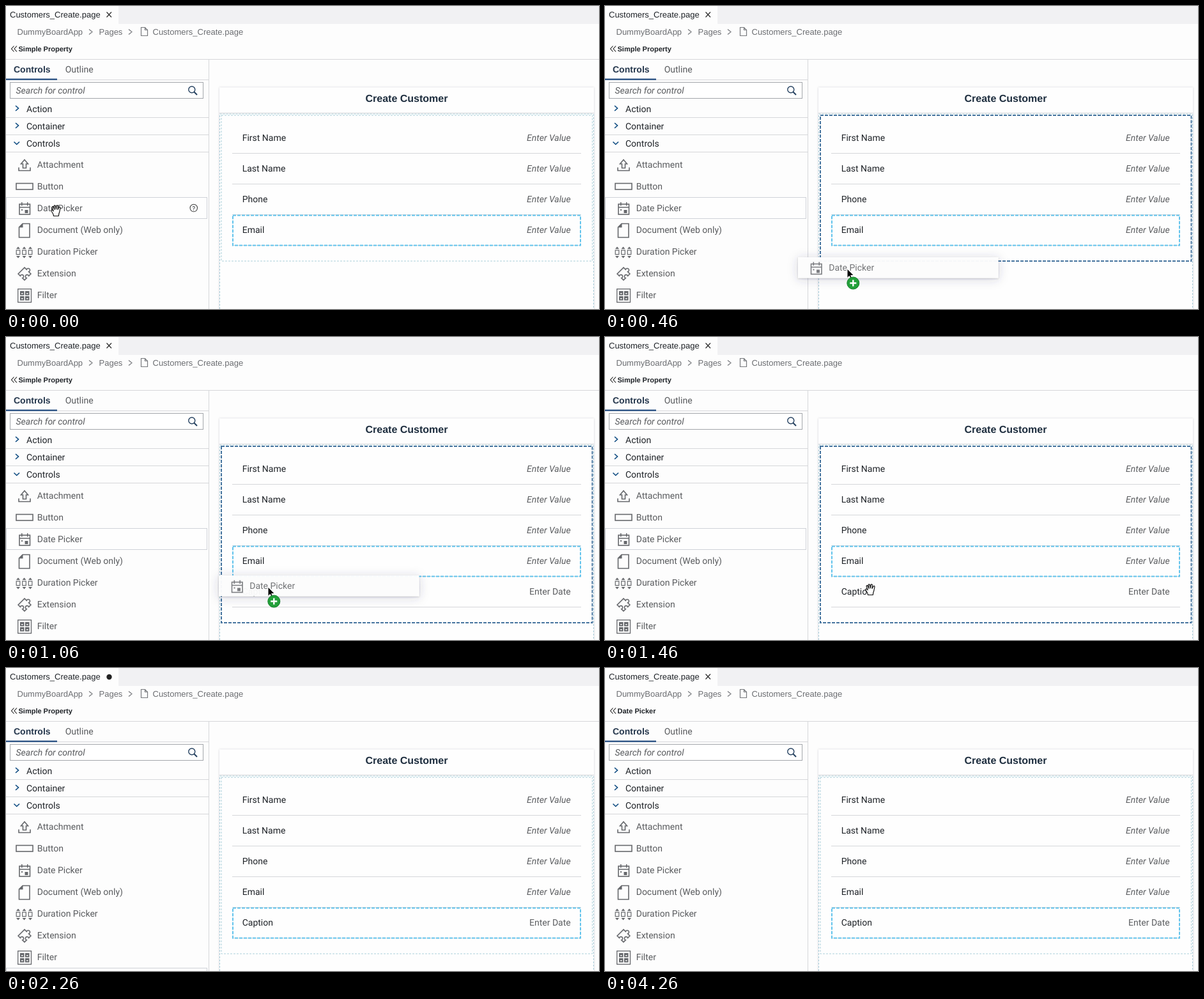
Recreate the animation shown at these times as an HTML page. Size 928x474 px, loop 4660 ms.

```html
<!DOCTYPE html>
<html lang="en">
<head>
<meta charset="utf-8">
<title>Page editor</title>
<style>
html, body { margin: 0; width: 100%; height: 100%; overflow: hidden; background: #fdfdfd }
svg { display: block }
text { font: 14px Roboto, sans-serif; fill: #1f2328; white-space: pre; text-rendering: geometricPrecision }
.file { font: 13px "Liberation Sans", Arial, sans-serif }
.crumb { fill: #6c6e72 }
.bold { font: bold 14px "Liberation Sans", Arial, sans-serif; fill: #24364c }
.item { fill: #595b5e }
.hint { fill: #5b5d60; text-anchor: end }
.italic { font-style: italic }
.line { stroke: #d6d7da; fill: none }
.icon { stroke: #66686c; stroke-width: 1.6; fill: none }
.icon .solid { fill: #66686c; stroke: none }
.chevron { stroke: #0c4a80; stroke-width: 1.6; fill: none }
.light { stroke: #abd0da; stroke-width: 1; stroke-dasharray: 3 2; fill: none }
.dark { stroke: #47759f; stroke-width: 2; stroke-dasharray: 5 2; fill: none }
</style>
</head>
<body>
<svg id="stage" width="928" height="474" viewBox="0 0 928 474"></svg>
<script>
const LOOP = 4660;
const text = (x, y, s, cls = '') => `<text x="${x}" y="${y}" class="${cls}">${s}</text>`;
const line = (x1, y, x2) => `<path class="line" d="M${x1} ${y}H${x2}"/>`;
const path = (d, cls = '') => `<path d="${d}" class="${cls}"/>`;
const icon = s => `<g class="icon">${s}</g>`;

const calendar = icon(
  '<rect x="21" y="310" width="16.5" height="16"/>' +
  path('M21 315H37.5M24.8 307V312.5M33.7 307V312.5') +
  path('M29.5 319h5v5h-5zM24 318h2v2h-2z', 'solid'));

const columns = [19, 28.5, 38].map(x =>
  `<rect x="${x - 2.8}" y="382" width="5.6" height="6.6" stroke-width="1.2"/>` +
  path(`M${x - 3} 380L${x} 376.5L${x + 3} 380ZM${x - 3} 391L${x} 394.5L${x + 3} 391Z`, 'solid')).join('');

const tiles = [[22, 446], [30, 446], [22, 454], [30, 454]].map(([x, y]) =>
  path(`M${x} ${y}h6.5v6.5h-6.5zM${x + 2} ${y + 3}v1.4h2.5v-1.4z`, 'solid')).join('');

const puzzle = '<g transform="translate(29 419) rotate(45)">' +
  path('M-7 -7H-2.4A2.7 2.7 0 1 1 2.4 -7H7V-2.4A2.7 2.7 0 1 0 7 2.4V7H2.4A2.7 2.7 0 1 0 -2.4 7H-7Z') + '</g>';

const items = [
  ['Attachment', icon(path('M29 240.5L34.5 247H31.5V253.5H26.5V247H23.5ZM20 252.5V257.5H38V252.5'))],
  ['Button', icon('<rect x="16" y="277.5" width="26" height="9.5"/>')],
  ['Date Picker', calendar],
  ['Document (Web only)', icon(path('M26 340.5H37V362H20.5V346Z') + path('M20 346.5L26.5 340V346.5Z', 'solid'))],
  ['Duration Picker', icon(columns)],
  ['Extension', icon(puzzle)],
  ['Filter', icon('<rect x="18.7" y="442.7" width="20.8" height="20.8" stroke-width="1.3"/>' + tiles)]
].map(([name, art], i) => art + text(48.7, 252.7 + 34 * i, name, 'item')).join('');

const sections = ['Action', 'Container', 'Controls'].map((name, i) => {
  const y = 160.5 + 27 * i;
  return text(32, y + 5, name) + line(0, y + 14, 317) +
    path(i < 2 ? `M15 ${y - 4.5}L19.5 ${y - .5}L15 ${y + 3.5}` : `M12.5 ${y - 2}L16.7 ${y + 2}L21 ${y - 2}`, 'chevron');
}).join('');

const field = (name, i, hint = 'Enter Value', cls = 'hint italic') =>
  text(369.7, 211 + 48 * i, name) + text(883.7, 211 + 48 * i, hint, cls) + line(354, 230.5 + 48 * i, 900);

document.getElementById('stage').innerHTML = `
<defs>
  <filter id="soft" x="-20%" y="-150%" width="140%" height="400%">
    <feDropShadow dx="0" dy="1" stdDeviation="1.2" flood-color="#334" flood-opacity=".22"/>
    <feDropShadow dx="0" dy="2" stdDeviation="8" flood-color="#335" flood-opacity=".2"/>
  </filter>
  <filter id="faint"><feDropShadow dx="0" dy="0" stdDeviation="1.5" flood-color="#223" flood-opacity=".2"/></filter>
</defs>
<rect width="928" height="28" fill="#f1f1f3"/><rect width="176" height="29" fill="#fdfdfd"/>
${text(6, 18, 'Customers_Create.page', 'file')}
<path id="close" d="M157.5 9.5L165 17.5M165 9.5L157.5 17.5" stroke="#333" stroke-width="1.3"/>
<circle id="dirty" cx="161.5" cy="14" r="4.2" fill="#222"/>
${text(17.5, 45, 'DummyBoardApp', 'file crumb')}${text(145.5, 45, 'Pages', 'file crumb')}
${text(229.5, 45, 'Customers_Create.page', 'file crumb')}
<path d="M130 36.5L135 40.5L130 44.5M192 36.5L197 40.5L192 44.5M211.5 33.5H217.5L221.5 37.5V46.5H211.5ZM217.5 33.5V37.5H221.5" fill="none" stroke="#77797d" stroke-width="1.2"/>
<path d="M12.5 62.5L8.5 67L12.5 71.5M17 62.5L13 67L17 71.5" fill="none" stroke="#222" stroke-width="1.1"/>
<text id="title" x="19.5" y="70.5" class="bold" style="font-size:11px;fill:#1f2328"></text>
${line(0, 83.5, 928)}<path class="line" d="M317.5 84V474"/>
${text(12, 104, 'Controls', 'bold')}${text(92.7, 104, 'Outline', 'item')}
${line(0, 115.5, 317)}<rect y="113.5" width="80" height="2.5" fill="#355a8a"/>
<rect x="6.5" y="119.5" width="302" height="25" fill="#fff" stroke="#a3a6ab"/>
${text(15.5, 136.5, 'Search for control', 'item italic')}
<path d="M294.5 134.5L299 139" stroke="#24405f" stroke-width="2"/>
<circle cx="290.8" cy="130.8" r="5" fill="none" stroke="#24405f" stroke-width="1.4"/>
${sections}
<rect id="hover" x=".5" width="314" height="33" fill="#fefefe" stroke="#cfd2d8"/>
${items}
<g id="help"><circle cx="293.8" cy="316" r="5.7" fill="none" stroke="#444" stroke-width="1.1"/>
  <text x="293.8" y="319.5" text-anchor="middle" style="font-size:9.5px">?</text></g>

<rect x="334" y="127.5" width="586" height="400" fill="#fefefe" filter="url(#faint)"/>
<text x="627" y="149.5" text-anchor="middle" class="bold" style="font-size:16px;fill:#1d2d3e">Create Customer</text>
${line(334, 167.5, 920)}
<rect class="light" x="334.5" y="169" width="585" height="400"/>
<rect id="form" x="337" y="171" width="580.5"/>
${['First Name', 'Last Name', 'Phone', 'Email'].map((name, i) => field(name, i)).join('')}
<g id="caption">${field('Caption', 4, 'Enter Date', 'hint')}</g>
<rect id="selected" x="355" width="544" height="47" fill="none" stroke="#62c3ec" stroke-width="2" stroke-dasharray="5 2"/>

<g id="ghost">
  <rect width="313.5" height="32.5" fill="#fefefe" fill-opacity=".95" filter="url(#soft)"/>
  <g transform="translate(-1 -299.5)" opacity=".85">
    <g transform="translate(.5 0)">${calendar}${text(48.7, 320.2, 'Date Picker', 'item')}</g>
  </g>
  <path d="M77 18V32.5L80.3 29.4L82.7 34.8L85 33.8L82.7 28.5H87.3Z" fill="#000" stroke="#fff"/>
  <circle cx="86.3" cy="40.5" r="9.5" fill="#23a03a" stroke="#14802a"/>
  <path d="M86.3 35.5V45.5M81.3 40.5H91.3" stroke="#fff" stroke-width="2.4"/>
</g>
<path id="hand" d="M-3.5 8.5Q-3.5 5.5 -7 1Q-7.7 -1 -6 -1Q-4.8 -.6 -3.8 .8L-5.8 -4.5Q-6 -6.8 -4.3 -6.3L-2 -1.5L-2.8 -7Q-2.3 -8.8 -.8 -7.7L.4 -2L1 -7.5Q2.2 -8.9 3.3 -7.3L3 -1.5L5 -5.3Q6.8 -6.2 7 -4.3L5.8 2Q4.5 5 4.3 8.5Z" fill="#fff" stroke="#111" stroke-width="1.2" stroke-linejoin="round"/>
<path id="arrow" d="M0 0V14.5L3.3 11.4L5.7 16.8L8 15.8L5.7 10.5H10.3Z" fill="#000" stroke="#fff"/>`;

const $ = id => document.getElementById(id);
const show = (id, on) => $(id).style.display = on ? '' : 'none';
const move = (id, x, y) => $(id).setAttribute('transform', `translate(${x} ${y})`);
const set = (id, name, value) => $(id).setAttribute(name, value);

// Hard steps of the dragged control: [start, x, y].
const drag = [
  [30, 60, 325], [60, 150, 365], [100, 230, 397], [260, 280, 399], [460, 302, 393],
  [660, 324.5, 381.5], [860, 333, 377], [1060, 333, 373]
];

function draw(t) {
  const within = (a, b) => t >= a && t < b;
  const added = t >= 860, done = t >= 2260;

  const dirty = within(2260, 3460);
  show('dirty', dirty);
  show('close', !dirty);
  $('title').textContent = t < 2460 ? 'Simple Property' : 'Date Picker';

  show('hover', t < 2460);
  set('hover', 'y', done ? 469.5 : 299.5);
  show('help', t < 30);

  set('form', 'class', within(260, 2260) ? 'dark' : 'light');
  set('form', 'height', added ? 276 : 228);
  show('caption', added);
  set('selected', 'y', done ? 375.5 : 327.5);

  const step = drag.filter(([start]) => t >= start).pop();
  const dragging = within(30, 1460);
  show('ghost', dragging);
  if (dragging) move('ghost', step[1], step[2]);

  show('hand', t < 30 || within(1460, 2060));
  move('hand', ...(t < 30 ? [78, 320] : [415, 395]));
  show('arrow', within(2060, 2260));
  move('arrow', 318, 464);
}

function tick() {
  draw(performance.now() % LOOP);
  requestAnimationFrame(tick);
}
tick();
</script>
</body>
</html>
```
